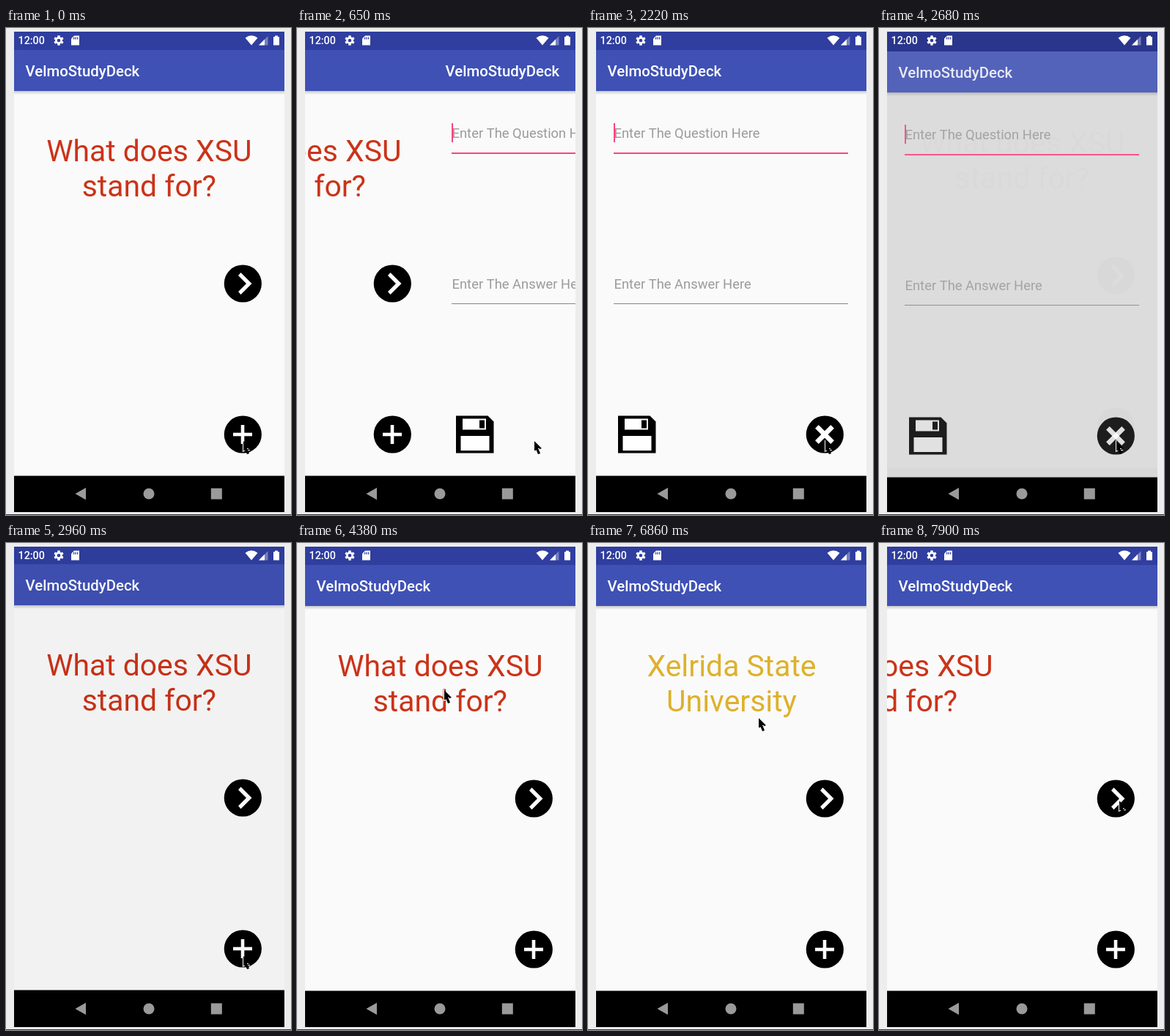
An HTML page with a canvas that plays this animation: 389x665 px, repeating every 8000 ms.

```html
<!DOCTYPE html>
<html lang="en">
<head>
<meta charset="utf-8">
<title>Flashcards</title>
<style>
  html, body { margin: 0; width: 100%; height: 100%; overflow: hidden; background: #ededed; }
  canvas { display: block; }
</style>
</head>
<body>
<canvas id="stage" width="389" height="665"></canvas>
<script>
const ctx = document.getElementById('stage').getContext('2d');
const LOOP = 8000;
const LEFT = 11, TOP = 5, WIDTH = 369, HEIGHT = 656;
const BLACK = '#000', WHITE = '#fff', PAPER = '#fafafa', ACCENT = '#ff4081';
const QUESTION = ['What does XSU', 'stand for?'];
const ANSWER = ['Xelrida State', 'University'];

const REFRESH = [
  0, 500, 650, 780, 920, 1230, 1810, 2220, 2680, 2830, 2960, 3110,
  3540, 3680, 3820, 3960, 4100, 4240, 4380, 4980,
  5410, 5560, 5700, 5830, 5980, 6130, 6290, 6440,
  6590, 6730, 6870, 7010, 7150, 7290, 7750, 7900
];

const progress = (t, start, duration) => Math.min(1, Math.max(0, (t - start) / duration));
const smooth = p => (1 - Math.cos(Math.PI * p)) / 2;
const settle = p => 1 - (1 - p ** 1.5) ** 3;

function rect(x, y, w, h, color) {
  ctx.fillStyle = color;
  ctx.fillRect(x, y, w, h);
}

function circle(x, y, r, color) {
  ctx.fillStyle = color;
  ctx.beginPath();
  ctx.arc(x, y, r, 0, 7);
  ctx.fill();
}

function polygon(color, ...points) {
  ctx.fillStyle = color;
  ctx.beginPath();
  for (let i = 0; i < points.length; i += 2) ctx.lineTo(points[i], points[i + 1]);
  ctx.fill();
}

function text(value, x, y, size, color, weight = 400, align = 'left') {
  ctx.font = `${weight} ${size}px Roboto, sans-serif`;
  ctx.textAlign = align;
  ctx.fillStyle = color;
  ctx.fillText(value, x, y);
}

// Offsets snap to whole pixels so that page edges stay sharp.
function layer(x, y, draw) {
  ctx.save();
  ctx.translate(Math.round(x), Math.round(y));
  draw();
  ctx.restore();
}

function lines(rows, x, color) {
  rows.forEach((row, i) => text(row, x, 182 + 48 * i, 40.9, color, 400, 'center'));
}

function page() {
  rect(LEFT, TOP, WIDTH, HEIGHT, BLACK);
  rect(LEFT, 30, WIDTH, 581.5, PAPER);
  rect(LEFT, TOP, WIDTH, 25, '#2f3e9f');
  rect(LEFT, 30, WIDTH, 56, '#3f51b5');
  const shade = ctx.createLinearGradient(0, 86, 0, 91);
  shade.addColorStop(0, 'rgba(0,0,0,.2)');
  shade.addColorStop(1, 'rgba(0,0,0,0)');
  rect(LEFT, 86, WIDTH, 5, shade);
  text('VelmoStudyDeck', 26.5, 66, 20.4, WHITE, 500);
}

function cross(angle, reach, thickness) {
  layer(323, 555, () => {
    ctx.rotate(angle);
    rect(-reach, -thickness / 2, reach * 2, thickness, WHITE);
    rect(-thickness / 2, -reach, thickness, reach * 2, WHITE);
  });
}

function cardPage(t) {
  page();
  if (t < 4980) {
    lines(QUESTION, 195.3, '#cb3318');
  } else if (t < 7750) {
    ctx.save();
    ctx.beginPath();
    ctx.arc(196, 191, 124 * smooth(progress(t, 4980, 1700)), 0, 7);
    ctx.clip();
    lines(ANSWER, 196, '#deb12c');
    ctx.restore();
  } else {
    lines(QUESTION, 195.3 - WIDTH * smooth(progress(t, 7654, 500)), '#cb3318');
  }
  circle(323.3, 349, 25.6, BLACK);
  polygon(WHITE, 317, 338, 320.5, 334, 335.5, 349, 320.5, 364, 317, 360, 328, 349);
  circle(323.3, 555, 25.6, BLACK);
  cross(0, 13, 4.6);
}

function editPage(t) {
  page();
  text('Enter The Question Here', 35.5, 150, 18.4, '#9b9b9b');
  text('Enter The Answer Here', 35.5, 356, 18.4, '#9b9b9b');
  rect(35, 170, 320, 2, ACCENT);
  rect(35, 376, 320, 1, '#858585');
  const caretHidden = (t >= 920 && t < 1230) || (t >= 1810 && t < 2220);
  if (!caretHidden) rect(35, 130, 2, 26, ACCENT);

  polygon(BLACK, 41, 529.5, 84.5, 529.5, 92.5, 537.5, 92.5, 580.5, 41, 580.5);
  rect(50, 533.5, 32, 15, WHITE);
  rect(73, 535.5, 7, 11, BLACK);
  rect(47.5, 557, 39, 20, WHITE);
  circle(323.3, 555, 25.6, BLACK);
  cross(Math.PI / 4, 15, 6.5);
}

function systemIcons() {
  text('12:00', 16.5, 22.3, 14.3, WHITE, 500);

  layer(72, 17, () => {
    for (let i = 0; i < 6; i++) {
      ctx.rotate(Math.PI / 3);
      rect(-1.7, -6.7, 3.4, 4, WHITE);
    }
    circle(0, 0, 5, WHITE);
    circle(0, 0, 2.3, '#2f3e9f');
  });
  polygon(WHITE, 93, 10.5, 100, 10.5, 100, 23.5, 89, 23.5, 89, 14.5);
  for (const x of [92, 94.5, 97]) rect(x, 12.5, 1.3, 3, '#2f3e9f');

  ctx.fillStyle = WHITE;
  ctx.beginPath();
  ctx.moveTo(335, 23.5);
  ctx.lineTo(326.5, 13.5);
  ctx.quadraticCurveTo(335, 7, 343.5, 13.5);
  ctx.fill();
  polygon('rgba(255,255,255,.35)', 345, 23.5, 357.5, 11, 357.5, 23.5);
  polygon(WHITE, 345, 23.5, 353, 15.5, 353, 23.5);
  rect(365, 12, 8, 11.5, WHITE);
  rect(367, 10.5, 4, 2, WHITE);

  const gray = '#9a9a9a';
  polygon(gray, 94.5, 636, 109, 627.8, 109, 644.2);
  circle(195, 636, 7.5, gray);
  rect(279.8, 628.5, 15, 15, gray);
}

function pointer(t) {
  const toCard = smooth(progress(t, 3400, 980));
  const toNext = smooth(progress(t, 6450, 840));
  const x = 323 - 123 * toCard + 127 * toNext;
  const y = 563 - 363 * toCard + 151 * toNext;
  layer(x, y, () => {
    polygon(BLACK, 0, 0, 0, 16, 3.5, 13, 6, 19, 9, 18, 7, 12.5, 11, 11);
    rect(0, 0, 1, 16, WHITE);
    rect(1, 14, 2, 1, WHITE);
    rect(6, 11, 2, 1, WHITE);
    rect(7, 13, 3, 1, WHITE);
  });
}

function screen(t) {
  if (t < 920) {
    const shift = t < 500 ? 0 : Math.round(WIDTH * smooth(progress(t, 393, 500)));
    layer(-shift, 0, () => cardPage(t));
    if (shift) layer(WIDTH - shift, 0, () => editPage(t));
  } else if (t < 2680) {
    editPage(t);
  } else {
    const close = progress(t, 2650, 450);
    const moved = settle(close);
    layer(0, -12 * (1 - moved), () => cardPage(t));
    rect(LEFT, TOP, WIDTH, HEIGHT, `rgba(0,0,0,${0.1 * (1 - close)})`);
    if (close < 0.5) {
      ctx.globalAlpha = 1 - 2 * close;
      layer(0, 35 * moved, () => editPage(t));
      ctx.globalAlpha = 1;
    }
  }
}

function draw(now) {
  const time = now % LOOP;
  const t = REFRESH.findLast(step => step <= time);
  rect(0, 0, 389, 665, '#ededed');
  rect(0, 664, 389, 1, '#333');
  ctx.save();
  ctx.beginPath();
  ctx.rect(LEFT, TOP, WIDTH, HEIGHT);
  ctx.clip();
  rect(LEFT, TOP, WIDTH, HEIGHT, BLACK);
  screen(t);
  systemIcons();
  ctx.restore();
  pointer(t);
  requestAnimationFrame(draw);
}

requestAnimationFrame(draw);
</script>
</body>
</html>
```
